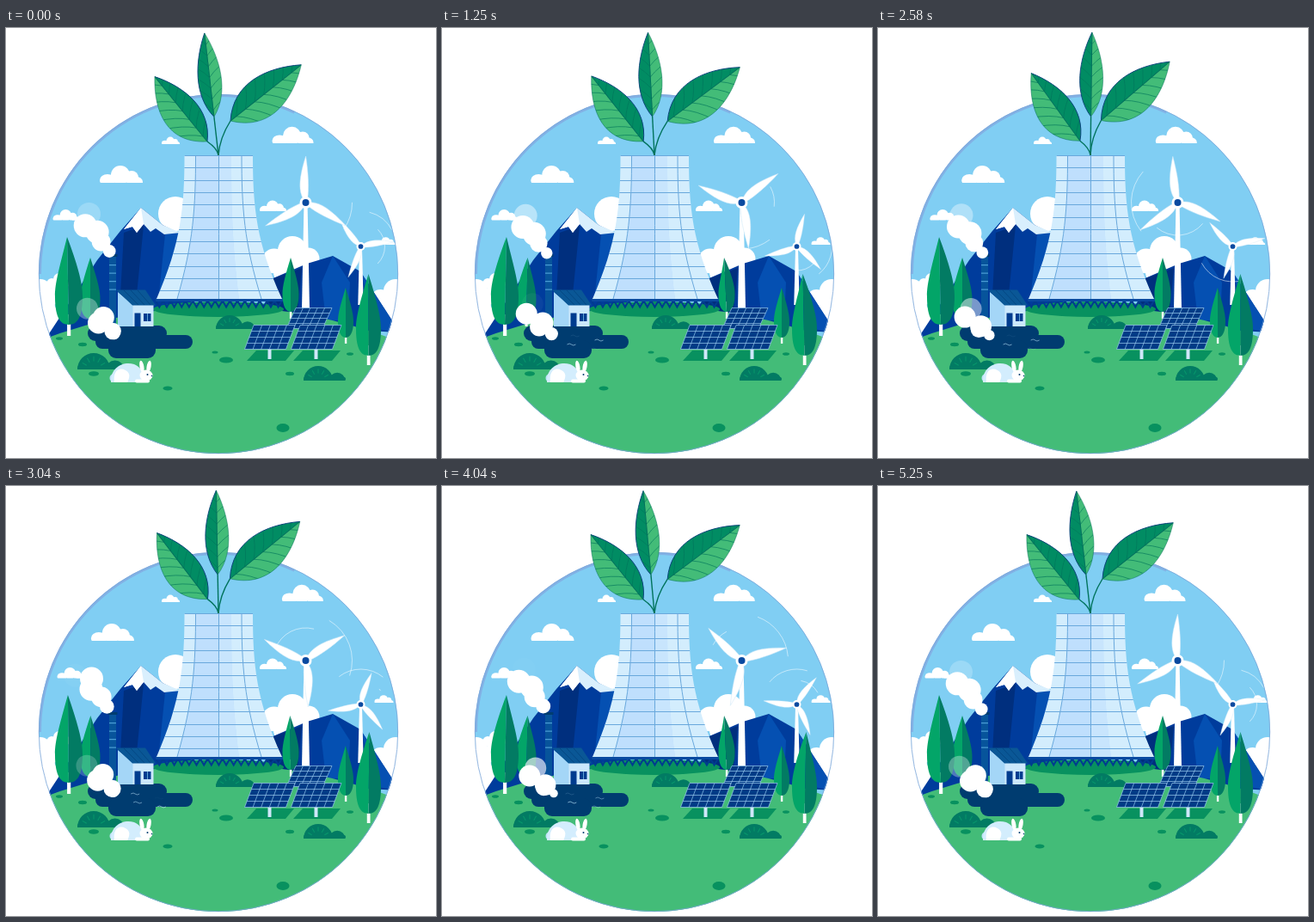
Recreate the animation shown at these times as an HTML page with a canvas. Size 500x500 px, loop 5290 ms.

```html
<!DOCTYPE html>
<html lang="en">
<head>
<meta charset="utf-8">
<title>Green energy</title>
<style>
html, body { margin: 0; width: 100%; height: 100%; overflow: hidden; background: #fff; }
canvas { display: block; width: 500px; height: 500px; }
</style>
</head>
<body>
<canvas id="stage" width="500" height="500"></canvas>
<script>
const c = document.getElementById('stage').getContext('2d');
const LOOP = 5290, SPAN = 5250, PI = Math.PI, TAU = PI * 2, RAD = PI / 180;
const WHITE = '#fff', NAVY = '#003c8f', GRASS = '#43bc78', DEEP = '#018c63', DARK = '#027b63';
const SPOT = '#08915f', WATER = '#003c70', PALE = '#d3edfd';
const wrap = (v, n) => (v % n + n) % n;
const clamp = v => Math.min(1, Math.max(0, v));

function poly(fill, ...p) {
  c.beginPath();
  for (let i = 0; i < p.length; i += 2) c.lineTo(p[i], p[i + 1]);
  c.closePath();
  c.fillStyle = fill;
  c.fill();
}
function oval(fill, x, y, rx, ry = rx) {
  c.beginPath();
  c.ellipse(x, y, rx, ry, 0, 0, TAU);
  c.fillStyle = fill;
  c.fill();
}
function box(fill, x, y, w, h, r = 0) {
  c.beginPath();
  c.roundRect(x, y, w, h, r);
  c.fillStyle = fill;
  c.fill();
}
function shape(d, fill, line, width = 1) {
  const p = new Path2D(d);
  if (fill) { c.fillStyle = fill; c.fill(p); }
  if (line) { c.strokeStyle = line; c.lineWidth = width; c.stroke(p); }
}
function ring(line, width, x, y, r, from = 0, to = TAU) {
  c.beginPath();
  c.arc(x, y, r, from, to);
  c.strokeStyle = line;
  c.lineWidth = width;
  c.stroke();
}
function at(x, y, deg, draw) {
  c.save();
  c.translate(x, y);
  c.rotate(deg * RAD);
  draw();
  c.restore();
}

function cloud(x, y, w) {
  at(x, y, 0, () => {
    c.scale(w / 50, w / 50);
    c.beginPath();
    c.rect(-40, -40, 80, 40);
    c.clip();
    oval(WHITE, -16, -3, 9, 7);
    oval(WHITE, -1, -9, 11);
    oval(WHITE, 12, -6, 8);
    oval(WHITE, 18, -1, 7, 6);
  });
}

function pile(x, y, r) {
  oval(WHITE, x, y, r);
  oval(WHITE, x - r * 1.25, y + r * .7, r * .85);
  oval(WHITE, x + r * 1.1, y + r * .55, r * .75);
  oval(WHITE, x, y + r * 1.4, r * 1.3);
}

function tree(x, top, foot, w, trunk, sway = 0) {
  const h = foot - top;
  box(WHITE, x - w * .06, foot - 12, Math.max(2, w * .13), 12 + trunk);
  for (const [side, fill] of [[-w, '#03a568'], [w, DARK]])
    shape(`M${x + sway} ${top}C${x + side * .28} ${top + h * .28} ${x + side * .52} ${top + h * .53}
      ${x + side * .5} ${top + h * .68}C${x + side * .5} ${foot - 5} ${x + side * .25} ${foot} ${x} ${foot}Z`, fill);
}

function bush(x, y, r, tail) {
  c.beginPath();
  c.arc(x, y, r, PI, TAU);
  c.arc(x + r * 1.3, y, r * .55, PI, TAU);
  c.fillStyle = DARK;
  c.fill();
  box(DARK, x - r, y - 4, r + tail, 4, 3);
  for (let i = -2; i < 3; i++) at(x, y, i * 30, () => shape(`M0 ${-r * .8}V${-r * .5}`, null, '#07986b'));
}

function sky(u) {
  const drift = 1 - Math.abs(1 - 2 * u);
  box('#80cef3', 30, 70, 430, 430);
  oval(WHITE, 197, 216, 20);
  cloud(333.5 + 13.5 * drift, 134, 48);
  cloud(134 - 12 * drift, 180, 50);
  cloud(70 + 6 * drift, 223.5, 31);
  cloud(310.5, 213, 31);
  cloud(191.5, 135, 21);
  cloud(442 - 3 * drift, 252, 22);
  pile(333, 259, 17);
  pile(453, 306, 14);
  pile(40, 305, 13);
  pile(62, 292, 7);
  pile(48, 332, 12);
}

function hills() {
  const main = '#003c9c', shade = '#002f7e', lit = '#0550b2';
  poly(main, 157, 209, 133, 236, 106, 270, 47, 360, 215, 345, 215, 250, 200, 238, 182, 229);
  poly(shade, 160, 230, 137, 238, 132, 330, 150, 330);
  poly(lit, 185, 240, 203, 237, 215, 252, 215, 300, 177, 318);
  poly('#d9effd', 157, 209, 137, 234, 147, 231, 152, 238, 160, 228, 168, 237, 174, 233, 184, 240, 203, 238, 182, 229);
  poly(WHITE, 157, 209, 137, 234, 147, 231, 152, 238, 160, 228);
  poly(main, 306, 293, 350, 274, 380, 265, 412, 283, 458, 354, 300, 345);
  poly(lit, 380, 265, 367, 296, 372, 340, 398, 340, 400, 296);
  poly(shade, 306, 293, 344, 279, 338, 340, 300, 340);
  poly(lit, 412, 283, 458, 354, 432, 350);
  shape('M30 367Q247 281 464 367V500H30Z', GRASS);
  for (const [x, y, r] of [[62, 361, 4], [89, 368, 5], [102, 402, 6], [188, 419, 5.5],
    [256, 386, 8], [243, 377, 3.5], [330, 402, 5], [400, 379, 4]]) oval(SPOT, x, y, r, r * .45);
  oval(SPOT, 322, 465, 7.5, 5);
}

function coolingTower() {
  oval(SPOT, 247, 327, 76, 9);
  bush(260, 350, 16, 48);
  c.beginPath();
  for (let i = 0; i <= 34; i++) c.lineTo(174 + i * 4.32, i % 2 ? 324.5 : 317);
  c.strokeStyle = NAVY;
  c.lineWidth = 2;
  c.stroke();
  box('#0a4aa0', 174, 314, 148, 4);

  // Every upright follows the same flare, stronger away from the middle.
  const upright = (top, foot) => `${top} 148C${top} 208 ${top + (foot - top) * .12} 250 ${foot} 315`;
  const back = (top, foot) => `${foot} 315C${top + (foot - top) * .12} 250 ${top} 208 ${top} 148`;
  const band = (fill, a, b, x, y) => shape(`M${upright(a, b)}L${back(x, y)}Z`, fill);
  band(PALE, 207.5, 175, 287, 321);
  band('#bfdffd', 220.5, 199, 262, 271);
  band('#c8e5fd', 247.5, 247.5, 262, 271);
  c.save();
  c.clip(new Path2D(`M${upright(207.5, 175)}L${back(287, 321)}Z`));
  for (const [a, b] of [[220.5, 199], [247.5, 247.5], [274, 297]]) shape('M' + upright(a, b), null, '#69a8dc');
  for (let i = 0; i < 12; i++) box('#69a8dc', 170, Math.round(148 + i * 14.3), 155, 1);
  c.restore();
}

// A leaf growing up from (x, y), both relative to the root of the plant.
function leaf(x, y, len, deg, sway, dark, light) {
  at(247, 148, sway, () => {
    shape(`M${x} ${y}Q${x * .1} ${y * .5} 0 0`, null, '#00735c', 1.4);
    at(x, y, deg, () => {
      const half = w => `M0 0C${w} ${-len * .28} ${w * .7} ${-len * .68} 0 ${-len}`;
      shape(half(light) + 'Z', GRASS, '#0c765f', .5);
      shape(half(dark) + 'Z', DEEP);
      shape(half(dark), null, '#0b417c', .9);
      c.clip(new Path2D(half(light) + half(dark)));
      for (let s = .08; s < .9; s += .13)
        shape(`M-30 ${-len * s - 22}Q-10 ${-len * s - 12} 0 ${-len * s}Q10 ${-len * s - 12} 30 ${-len * s - 22}`, null, '#00765b', .6);
      shape(`M0 0V${-len}`, null, '#00735c', 1);
    });
  });
}

function plant(t) {
  const peak = 2600, rest = 4350;
  const k = t < peak ? t / peak : clamp((rest - t) / (rest - peak));
  leaf(-13, -16, 97, -39, 3.3 * k ** 2.5, 28, -38);
  leaf(14, -40, 105, 51.6, 2.2 * Math.sin(1.5 * PI * k), -33, 38);
  leaf(0, -45, 98, 0, -6.5 + 7.3 * k, -21, 21);
}

function turbine(x, y, len, foot, deg) {
  const s = len / 53;
  poly(WHITE, x - 2 * s, y, x + 2 * s, y, x + 4.5 * s, foot, x - 4.5 * s, foot);
  for (let i = 0; i < 3; i++) at(x, y, deg + i * 120, () => {
    c.scale(s, s);
    shape('M3 -2C13 -9 29 -8 54 0C34 3 17 4 3 2Z', WHITE, '#cfe8f8', .5);
  });
  oval(WHITE, x, y, 7 * s);
  oval('#0a4aa0', x, y, 4 * s);
}

function wind(u) {
  const bulge = Math.sin(PI * u);
  const gust = (x, y, r, base, len) => {
    const mid = base + 1800 * u;
    if (len > 1) ring('rgba(255,255,255,.65)', .8, x, y, r, (mid - len / 2) * RAD, (mid + len / 2) * RAD);
  };
  turbine(412.5, 254, 38, 322, -8 + 720 * u);
  turbine(348.5, 203, 53, 326, -90 + 720 * u);
  gust(348.5, 203, 54, 17, 35 + 45 * bulge);
  gust(348.5, 203, 38, -80, 100 * bulge ** 2 - 10);
  gust(412.5, 254, 41, -52, 48 + 30 * bulge);
  gust(412.5, 254, 28, 0, 90 * (1 - bulge ** 2));
}

function panel(x, y, w, h, slant) {
  c.save();
  c.transform(w, 0, -slant, h, x, y);
  box('#003b86', 0, 0, 1, 1);
  c.beginPath();
  for (let i = 0; i <= 5; i++) { c.moveTo(i / 5, 0); c.lineTo(i / 5, 1); }
  for (let j = 0; j <= 4; j++) { c.moveTo(0, j / 4); c.lineTo(1, j / 4); }
  c.restore();
  c.strokeStyle = '#9dc9ee';
  c.lineWidth = .7;
  c.stroke();
}

function solar() {
  for (const x of [0, 54]) {
    poly(SPOT, 291 + x, 375, 335 + x, 375, 325 + x, 387, 280 + x, 387);
    box('#cfe8fa', 304.5 + x, 373, 4, 12);
  }
  panel(337, 325.5, 42, 24, 11);
  panel(288, 345.5, 48, 28, 10.5);
  panel(342, 345.5, 48, 28, 10.5);
}

function pond(t) {
  box(WATER, 95, 346, 92, 18, 9);
  box(WATER, 104, 357, 113, 16, 8);
  box(WATER, 119, 363, 55, 21, 9);
  const calm = clamp(t / 500) * clamp((SPAN - t) / 500);
  for (let i = 0; i < 4; i++) {
    const k = wrap(t / 1312.5 - i * .3, 1);
    c.globalAlpha = .75 * Math.sin(PI * k) * calm;
    at(148 + i % 2 * 30 + 7 * k, 358 + i * 5, 0, () => shape('M-5 0Q-2 -2 0 0Q2 2 5 0', null, '#b8def5', .9));
  }
  c.globalAlpha = 1;
}

function house() {
  box('#07549b', 120, 264, 8, 82);
  for (let i = 0; i < 4; i++) box('#4a9bd4', 120, 275 + i * 9.5, 8, 1.2);
  box(WATER, 118.5, 263, 11, 3);
  poly('#a4d6f7', 130, 307, 148, 322, 148, 347, 130, 347);
  box('#cbe8fc', 147.5, 321, 24, 26);
  poly('#0a5796', 128, 304.5, 162, 304.5, 174, 322.5, 147, 322.5);
  for (let i = 0; i < 3; i++) shape(`M${137 + i * 8} 305l${17 - i} 17`, null, '#03457f', .8);
  box(NAVY, 149.5, 331.5, 7, 15.5);
  box(NAVY, 160, 332, 8.5, 9);
  box('#7fbce8', 164, 332, .8, 9);
}

// Puffs leave by turns along two curves, one every half cycle.
function smoke(t, cycle, first, size, from, curves) {
  const life = cycle * 2.5, puffs = [];
  curves.forEach((curve, n) => {
    for (let age = wrap(t - first + n * cycle / 2, cycle); age < life; age += cycle)
      puffs.push([age / life, ...curve]);
  });
  puffs.sort((a, b) => b[0] - a[0]);
  for (const [k, bend, end] of puffs) {
    const [x, y] = from.map((v, i) => v * (1 - k) ** 2 + 2 * bend[i] * k * (1 - k) + end[i] * k * k);
    c.globalAlpha = clamp((1 - k) / .19) ** 2;
    oval(WHITE, x, y, size * Math.min(1, .4 + 1.3 * k, k * 8));
  }
  c.globalAlpha = 1;
}

function rabbit() {
  const shade = '#bfe2f8';
  oval(shade, 126, 407, 5.5, 5);
  shape('M122 412C121 395 136 387 149 391C156 394 160 399 161 412Z', PALE);
  shape('M126 412C124 398 132 394 139 398C146 402 143 408 141 412Z', WHITE);
  for (const [x, deg] of [[159, -10], [165, 10]]) at(x, 400, deg, () => oval(WHITE, 0, -6.5, 2.5, 7));
  oval(WHITE, 163, 404, 7.5, 6.5);
  box(WHITE, 150, 408.5, 17, 4, 2);
  oval(WATER, 164.5, 403, 1);
  oval(WATER, 169.5, 404.5, .8);
}

function scene(t) {
  const u = t / SPAN, swing = 1 - Math.cos(u * 2 * TAU);
  box(WHITE, 0, 0, 500, 500);
  c.save();
  c.beginPath();
  c.arc(247, 286, 209, 0, TAU);
  c.clip();
  sky(u);
  hills();
  tree(98, 267, 338, 23, 9, swing * .8);
  tree(73, 243, 345, 32, 13, -2 + swing * 2);
  coolingTower();
  tree(331, 267, 330, 19, 8, -swing * 1.5);
  wind(u);
  tree(395, 302, 360, 18, 7);
  tree(421.5, 286, 381, 29, 11, -2 * Math.sin(u * TAU));
  solar();
  pond(t);
  house();
  smoke(t, SPAN / 8, 472, 13.5, [125, 266], [[[103, 237], [95, 212]], [[102, 236], [79, 219]]]);
  smoke(t, SPAN / 7, 575, 12.5, [131, 358], [[[103, 346], [92, 321]], [[120, 353], [104, 318]]]);
  bush(102, 397, 19, 38);
  bush(363, 410, 17, 32);
  rabbit();
  ring('rgba(130,150,215,.5)', 6, 247, 286, 209, PI, TAU * .82);
  c.restore();
  ring('#7fa6d8', .8, 247, 286, 208.7);
  plant(t);
}

const start = performance.now();
function frame() {
  scene(Math.min((performance.now() - start) % LOOP, SPAN));
  requestAnimationFrame(frame);
}
frame();
</script>
</body>
</html>
```
